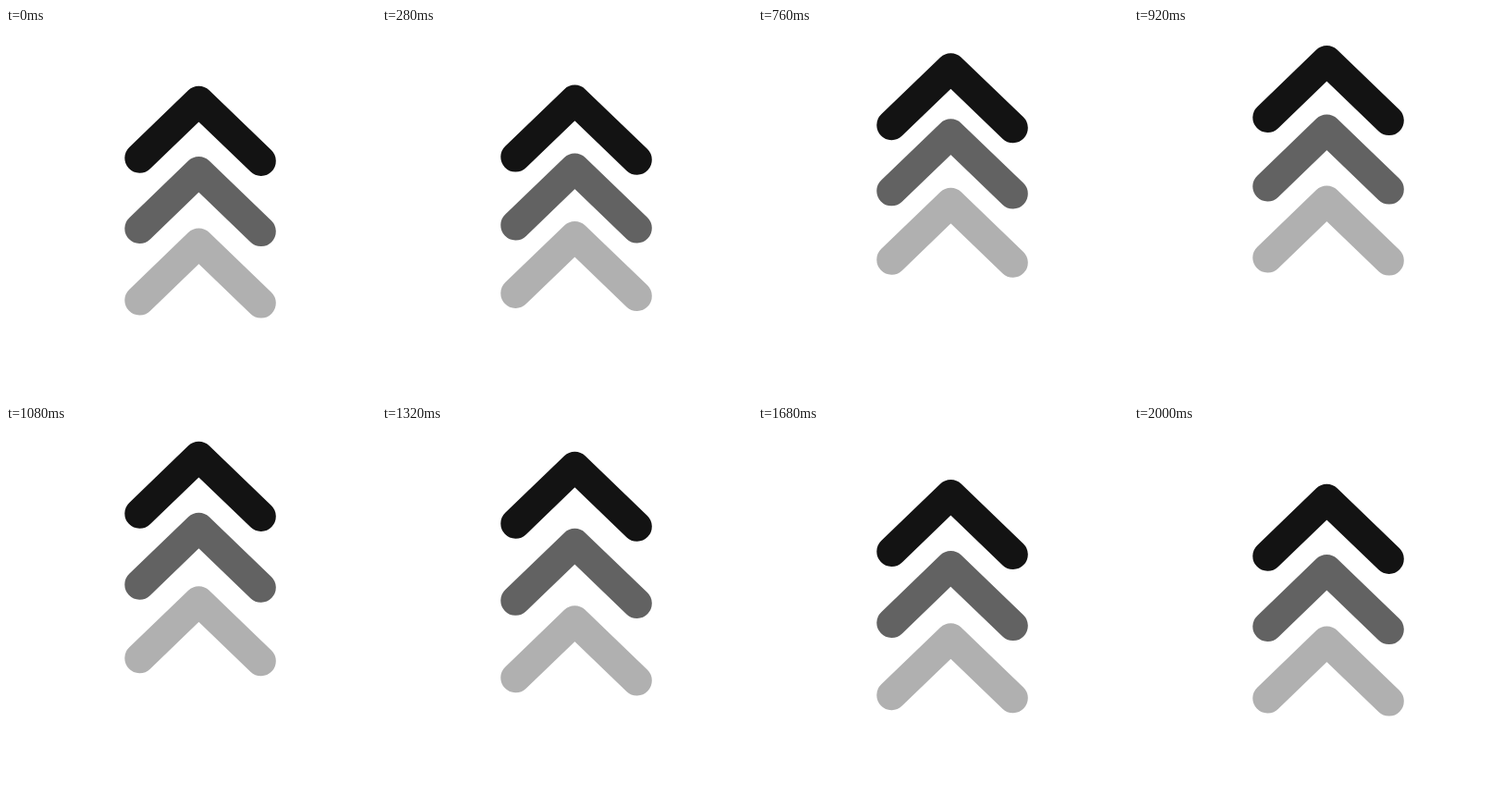
Recreate the animation shown at these times as an HTML page. Size 400 px wide and 400 px high, loop 2.24 s.

```html
<!DOCTYPE html>
<html lang="en">
<head>
<meta charset="utf-8">
<title>Rising chevrons</title>
<style>
  html, body { margin: 0; width: 100%; height: 100%; overflow: hidden; background: #fff; }
  svg { display: block; width: 100%; height: 100%; }
  polyline { fill: none; stroke-width: 32.4; stroke-linecap: round; stroke-linejoin: round; }
</style>
</head>
<body>
<svg viewBox="0 0 400 400">
  <polyline points="144.5,294.3 208.4,232.7 275.6,297.4" stroke="#b0b0b0"/>
  <polyline points="144.5,216.8 208.4,155.2 275.6,219.9" stroke="#626262"/>
  <polyline points="144.5,140.6 208.4,79 275.6,143.7" stroke="#131313"/>
</svg>
<script>
  const LOOP = 2240, STEP = 40, REST = 2000;
  const LIFT = 46, STAGGER = 80, RISE = 920, FALL_END = 2040;
  const chevrons = [...document.querySelectorAll('polyline')];

  // Cubic bezier easing whose control points sit at y = 0 and y = 1.
  function ease(x1, x2) {
    return u => {
      if (u <= 0) return 0;
      if (u >= 1) return 1;
      let lo = 0, hi = 1, s = 0.5;
      for (let i = 0; i < 24; i++) {
        const r = 1 - s;
        const x = 3 * x1 * s * r * r + 3 * x2 * s * s * r + s * s * s;
        if (x < u) lo = s; else hi = s;
        s = (lo + hi) / 2;
      }
      return s * s * (3 - 2 * s);
    };
  }

  const rise = ease(0.5, 0.5);
  const fall = ease(0.4, 0.2);

  // The lowest chevron leads; all of them settle together.
  function height(t, i) {
    if (t >= REST) return 0;
    const start = i * STAGGER, peak = start + RISE;
    return t < peak
      ? LIFT * rise((t - start) / RISE)
      : LIFT * (1 - fall((t - peak) / (FALL_END - peak)));
  }

  const origin = performance.now();

  function draw() {
    const elapsed = (performance.now() - origin) % LOOP;
    const t = Math.floor(elapsed / STEP) * STEP;
    chevrons.forEach((c, i) =>
      c.setAttribute('transform', `translate(0 ${(-height(t, i)).toFixed(2)})`));
    requestAnimationFrame(draw);
  }
  draw();
</script>
</body>
</html>
```
